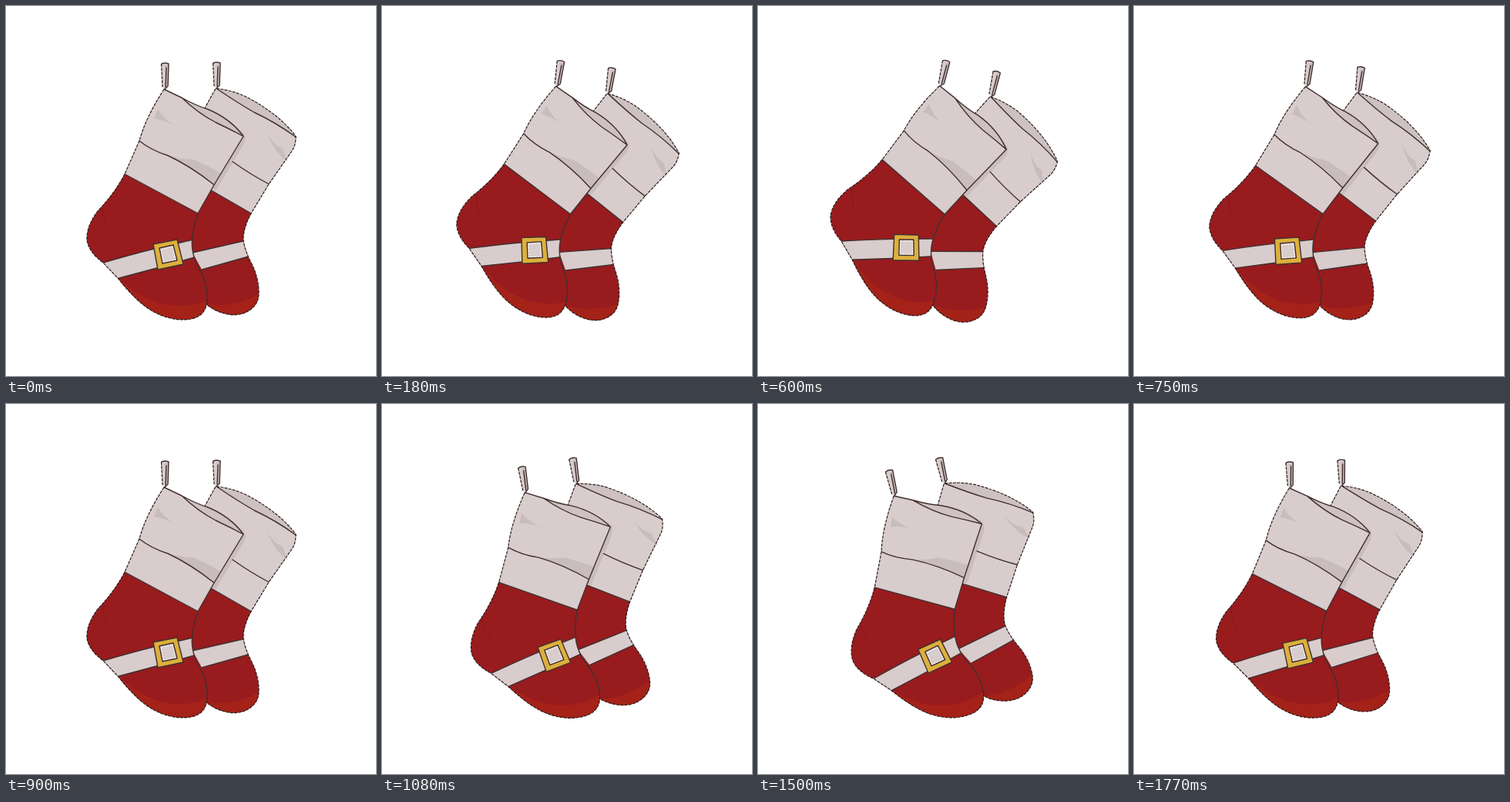
Write an HTML page that moves like this. It is 480x480 px and loops after 1.8 s.

```html
<!DOCTYPE html>
<html lang="en">
<head>
<meta charset="utf-8">
<title>Swinging stockings</title>
<style>
  html, body { margin: 0; width: 100%; height: 100%; overflow: hidden; background: #fff; }
  svg { display: block; width: 100%; height: 100%; }
  path { stroke-linejoin: round; stroke-linecap: round; }
  .red { fill: #981b1e; }
  .toe { fill: #a42218; }
  .wool { fill: #d8cccc; }
  .shade { fill: #c8bcbc; }
  .rim { fill: #cdc1c1; }
  .gold { fill: #dcb03c; }
  .line { fill: none; stroke: #40302f; stroke-width: 1.4; }
  .edge { fill: none; stroke: #2e1d1c; stroke-width: 1.2; stroke-dasharray: 4 1.3; stroke-linecap: butt; }
  .fold { fill: none; stroke: #861719; stroke-width: 1; }
  .glint { fill: none; stroke: #fff; stroke-width: .8; stroke-dasharray: 2 2; }
</style>
</head>
<body>
<svg viewBox="0 0 480 480">
  <defs>
    <g id="hook">
      <path class="wool" d="M201 75Q206 73 211 75L210 104Q206 110 203 105Z"/>
      <path class="shade" d="M206 77L211 76L210 104L207 107Z"/>
      <path class="line" d="M202 75Q206 73 211 75L210 104L206 108M208 80L207 105"/>
      <path class="edge" d="M201.5 75L203 105"/>
    </g>
    <clipPath id="backFoot">
      <path id="backShape" d="M266 239L318 269Q307 290 308 304Q310 318 319 335Q328 353 328 372Q328 389 312 397Q302 402 288 400Q272 397 260 387L232 320V260Z"/>
    </clipPath>
    <clipPath id="frontFoot">
      <path id="frontShape" d="M154 218L249 269Q239 297 242 317Q244 331 254 347Q262 364 261 381Q260 402 240 406Q217 410 192 397Q171 386 145 353L126 333Q108 320 105 304Q104 286 119 266Q141 243 154 218Z"/>
    </clipPath>
  </defs>

  <g id="swing">
    <use href="#hook" x="67" y="-1"/>
    <use href="#backShape" class="red"/>
    <g clip-path="url(#backFoot)">
      <path class="toe" d="M250 385Q292 396 335 370V410H250Z"/>
      <path class="wool" d="M242 320L312 304L318 324L254 342Z"/>
      <path class="line" d="M242 320L312 304M254 342L318 324"/>
    </g>
    <path class="wool" d="M272 107Q293 109 312 118Q354 140 376 169Q376 181 371 188L341 231L318 269L266 239L257 134Z"/>
    <path class="shade" d="M258 133Q292 148 309 166Q313 173 305 185L272 240L262 236L290 165Z"/>
    <path class="shade" d="M339 165Q347 181 359 185L365 202Q348 190 339 165Z"/>
    <path class="rim" d="M274 108Q293 110 312 119Q353 140 375 169Q349 151 322 138Z"/>
    <path class="line" d="M273 107Q301 126 322 138Q350 151 376 170M294 202Q318 219 341 231M266 239L318 269"/>
    <path class="edge" d="M257 134L272 107Q293 109 312 118Q354 140 376 169Q376 181 371 188L341 231L318 269Q307 290 308 304Q310 318 319 335Q328 353 328 372Q328 389 312 397Q302 402 288 400Q272 397 260 387"/>

    <use href="#hook"/>
    <use href="#frontShape" class="red"/>
    <g clip-path="url(#frontFoot)">
      <path class="toe" d="M145 353Q185 390 226 389Q247 389 265 380V415H145Z"/>
      <path class="wool" d="M124 334Q160 323 190 315.5L243 303L248 325L201 338.5L142 354Z"/>
      <path class="line" d="M126 333Q160 323 190 315.5L243 303M143 354L201 338.5L248 325"/>
      <path class="fold" d="M125 262Q126 276 132 288"/>
    </g>
    <path class="wool" d="M205 108L228 119Q246 129 262 134Q291 146 308 169L270 232L249 269L154 218L173 175Q181 145 205 108Z"/>
    <path class="shade" d="M197 134L192 146Q206 148 222 157Q206 149 197 134Z"/>
    <path class="shade" d="M211 194Q228 199 243 199Q265 209 279 217L270 232Q247 213 211 194Z"/>
    <path class="rim" d="M228 119Q246 129 262 134Q291 146 308 169Q291 160 272 151Q249 139 228 119Z"/>
    <path class="line" d="M205 108L228 119Q246 129 262 134Q291 146 308 169L270 232L249 269M228 119Q249 139 272 151Q291 160 308 169M173 175Q188 187 210 194Q240 208 270 232M154 218L249 269Q239 297 242 317Q244 331 254 347Q262 364 261 381"/>
    <path class="edge" d="M205 108Q181 145 173 175L154 218Q141 243 119 266Q104 286 105 304Q108 320 126 333L145 353Q171 386 192 397Q217 410 240 406Q260 402 261 381"/>
    <g transform="translate(0 -1)">
      <path class="gold" fill-rule="evenodd" d="M191 310L222 304L230 336L197 343ZM199 315L217 311L222 331L203 335Z"/>
      <path class="line" d="M191 310L222 304L230 336L197 343ZM199 315L217 311L222 331L203 335Z"/>
      <path class="glint" d="M201 317L216 313L220 330L204 333Z"/>
    </g>
  </g>
</svg>
<script>
  const LOOP = 1800, STEP = 30, SWING = 15;
  const swing = document.getElementById('swing');
  const start = performance.now();

  function draw(ms) {
    const time = Math.floor((ms + 0.5) / STEP) * STEP % LOOP;
    const angle = SWING * Math.sin(2 * Math.PI * time / LOOP);
    swing.setAttribute('transform', `rotate(${angle.toFixed(3)} 240 240)`);
  }

  function tick() {
    draw(performance.now() - start);
    requestAnimationFrame(tick);
  }
  tick();
</script>
</body>
</html>
```
